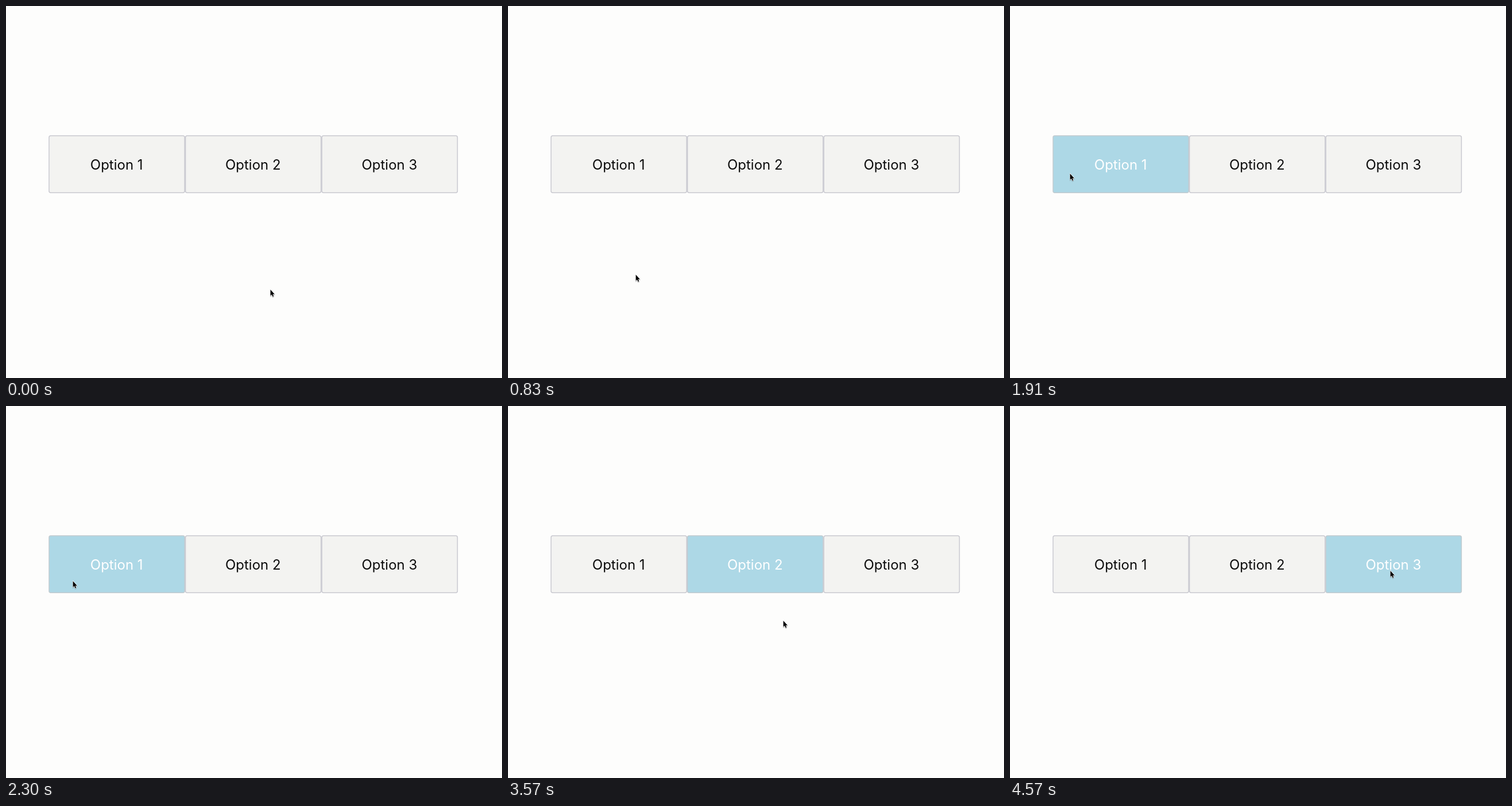
Animation, 864 px wide and 648 px high, one loop 5780 ms. Source, as an HTML page:

```html
<!DOCTYPE html>
<html lang="en">
<head>
<meta charset="utf-8">
<title>Option picker</title>
<style>
  html, body { margin: 0; width: 100%; height: 100%; overflow: hidden; background: #fdfdfc; }
  svg { display: block; width: 864px; height: 648px; }
  rect { fill: #f3f3f1; stroke: #c9c9d0; stroke-width: 1.5; }
  text { font: 24px Inter, sans-serif; text-anchor: middle; fill: #0c0c0c; }
  .on rect { fill: #add8e6; stroke: #c2cbd0; }
  .on text { fill: #fff; }
  #cursor { filter: drop-shadow(0 1px .7px rgba(0, 0, 0, .35)); }
  #cursor path { fill: #000; stroke: #fff; stroke-width: 1.2; paint-order: stroke; stroke-linejoin: round; }
</style>
</head>
<body>
<svg viewBox="0 0 864 648">
  <g class="option"><rect width="236.2" height="99.2" rx="3"/><text x="117.7" y="58.5">Option 1</text></g>
  <g class="option"><rect width="236.2" height="99.2" rx="3"/><text x="117.7" y="58.5">Option 2</text></g>
  <g class="option"><rect width="236.2" height="99.2" rx="3"/><text x="117.7" y="58.5">Option 3</text></g>
  <g id="cursor"><path d="M-.4 0V10.8L2 8.6L3.6 12.3L5.3 11.6L3.8 8H6.8Z"/></g>
</svg>
<script>
  const LOOP = 5780, FPS = 23;

  // Each stroke glides through its points and ends at rest, then clicks an option
  const strokes = [
    { click: 1910, points: [[0, 461, 494], [330, 387, 528], [430, 363, 525], [1220, 126, 387], [1740, 105, 292]] },
    { click: 3260, points: [[2090, 105, 292], [2300, 117, 305], [2480, 120, 309], [3130, 422, 259]] },
    { click: 4220, points: [[3260, 422, 259], [3570, 480, 374], [3700, 592, 338], [4000, 663, 287]] }
  ];

  const options = document.querySelectorAll('.option');
  const cursor = document.getElementById('cursor');
  options.forEach((o, i) => o.setAttribute('transform', `translate(${75 + 237.6 * i} 226)`));

  const rate = (a, b, k) => (b[k] - a[k]) / (b[0] - a[0]);

  // Harmonic mean of the neighbouring rates avoids overshoot
  function slope(points, i, k) {
    const last = points.length - 1;
    if (i === last) return 0;
    const after = rate(points[i], points[i + 1], k);
    if (i === 0) return points[0][0] ? 0 : after;
    const before = rate(points[i - 1], points[i], k);
    return before * after <= 0 ? 0 : 2 * before * after / (before + after);
  }

  function pointAt(t) {
    const { points } = strokes.findLast(s => s.points[0][0] <= t);
    const i = Math.min(points.findLastIndex(p => p[0] <= t), points.length - 2);
    const a = points[i], b = points[i + 1], span = b[0] - a[0];
    const u = Math.min(1, (t - a[0]) / span), v = 1 - u;
    return [1, 2].map(k =>
      v * v * (1 + 2 * u) * a[k] + u * u * (3 - 2 * u) * b[k] +
      span * u * v * (v * slope(points, i, k) - u * slope(points, i + 1, k)));
  }

  function draw(now) {
    const t = now % LOOP;
    const tick = Math.floor((Math.floor(t / 10) * 10 + 5) * FPS / 1000);
    const time = Math.round(tick * 100 / FPS) * 10;
    const [x, y] = pointAt(time).map(Math.round);
    cursor.setAttribute('transform', `translate(${x} ${y})`);
    const chosen = strokes.findLastIndex(s => s.click <= time);
    options.forEach((o, i) => o.classList.toggle('on', i === chosen));
  }

  const start = performance.now();
  function frame() {
    draw(performance.now() - start);
    requestAnimationFrame(frame);
  }
  frame();
</script>
</body>
</html>
```
